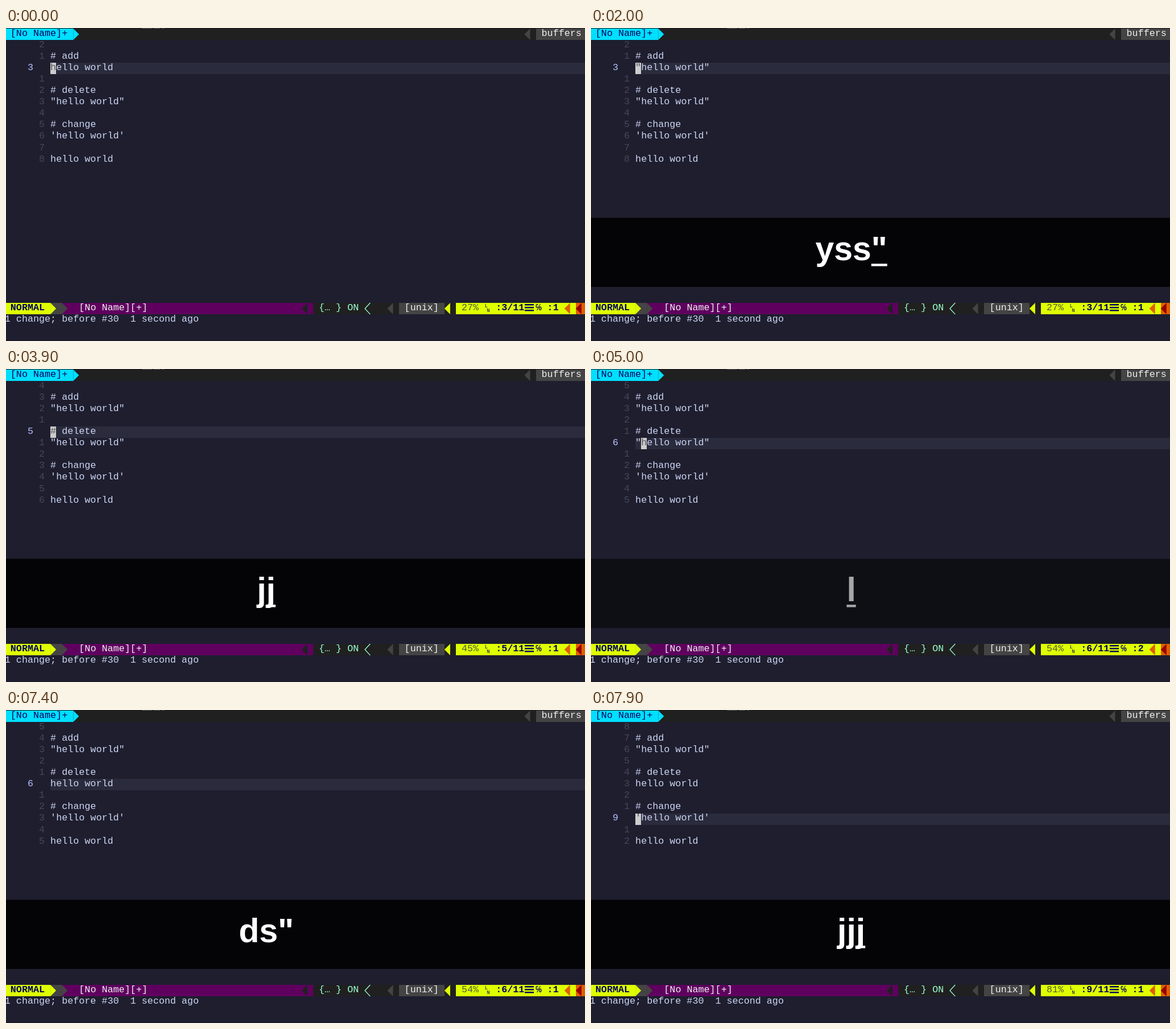
An HTML page with a canvas for the animation above (8000 ms loop, 1018 by 550 pixels).

```html
<!DOCTYPE html>
<html lang="en">
<head>
<meta charset="utf-8">
<title>Editor screencast</title>
<style>
  html, body { margin: 0; width: 100%; height: 100%; overflow: hidden; background: #1e1e2e; }
  canvas { display: block; }
</style>
</head>
<body>
<canvas id="stage" width="1018" height="550"></canvas>
<script>
const ctx = document.getElementById('stage').getContext('2d');
const LOOP = 8000, STEP = 100;
const W = 1018, H = 550;
const CELL_W = 10.04, CELL_H = 20.1, LEFT = -2.2, TOP = 0.7;
const MONO = '16.73px "Liberation Mono", monospace';
const KEY_SIZE = 59, KEY_CENTER = 457.6, KEY_BASELINE = 408;

const C = {
  bg: '#1e1e2e', line: '#2a2b3c', text: '#cdd6f4', num: '#45475a', current: '#b4befe',
  cursor: '#cccccc', bar: '#202020', gray: '#444444', cyan: '#00dfff', yellow: '#dfff00',
  purple: '#5f005f', navy: '#00005f', mint: '#9cffd3', orange: '#df5f00', red: '#990000',
  white: '#f0f0f0'
};

// [time, value]: each value holds until the next entry
const cursorOn = [[0, 1], [500, 0], [1000, 1], [1500, 0], [1600, 1], [2600, 0], [3100, 1], [4600, 0],
  [4900, 1], [5400, 0], [5900, 1], [6400, 0], [6500, 1], [7400, 0], [7600, 1]];
const cursorLine = [[0, 3], [3500, 4], [3800, 5], [4100, 6], [7600, 7], [7800, 8], [7900, 9]];
const cursorCol = [[0, 0], [4900, 1], [6800, 0]];
const pending = [[0, ''], [1300, 'y'], [1600, 'ys'], [1800, 'yss'], [1900, ''], [6300, 'd'], [6500, '']];
const keys = [[0, ''], [1300, 'y'], [1600, 'ys'], [1800, 'yss'], [1900, 'yss"'],
  [3500, 'j'], [3800, 'jj'], [4100, 'jjj'], [5000, 'l'],
  [6300, 'd'], [6500, 'ds'], [6800, 'ds"'], [7600, 'j'], [7800, 'jj'], [7900, 'jjj']];

// [time, opacity]: interpolated linearly
const fade = [[0, 0], [1200, 0], [1300, .22], [1600, 1], [2600, 1], [2700, .73], [2900, .13], [3000, 0],
  [3400, 0], [3500, .1], [3800, .94], [3900, 1], [4700, 1], [4800, .85], [4900, .55], [5000, .63],
  [5200, 1], [5500, 1], [5600, .85], [5800, .25], [5900, 0], [6200, 0], [6300, .1], [6600, .94],
  [6700, 1], [7400, 1], [7500, .7], [7600, .6], [7700, 1], [8000, 1]];

const entryAt = (track, t) => track.findLast(e => e[0] <= t);
const valueAt = (track, t) => entryAt(track, t)[1];

function lerpAt(track, t) {
  const i = track.findIndex(e => e[0] > t);
  const [t0, a] = track[i - 1], [t1, b] = track[i];
  return a + (b - a) * (t - t0) / (t1 - t0);
}

const colX = col => LEFT + col * CELL_W;
const rowY = row => TOP + row * CELL_H;

function rect(color, x, y, w, h) {
  ctx.fillStyle = color;
  ctx.fillRect(x, y, w, h);
}

function cells(color, row, from, to) {
  const x = Math.round(colX(from)), y = Math.round(rowY(row));
  rect(color, x, y, Math.round(colX(to)) - x, Math.round(rowY(row + 1)) - y);
}

function write(str, row, col, color, bold) {
  ctx.font = (bold ? 'bold ' : '') + MONO;
  ctx.fillStyle = color;
  ctx.fillText(str, colX(col), rowY(row) + 12.8);
}

// dir 1 points right, -1 points left
function arrow(row, col, dir, color) {
  const x = colX(dir > 0 ? col : col + 1), y = Math.round(rowY(row));
  ctx.fillStyle = color;
  ctx.beginPath();
  ctx.moveTo(x, y);
  ctx.lineTo(x + dir * CELL_W, y + CELL_H / 2);
  ctx.lineTo(x, y + CELL_H);
  ctx.fill();
}

function drawTabs() {
  rect('#181820', 0, 0, W, 1);
  rect('#55565c', 239, 0, 18, 1);
  rect('#55565c', 260, 0, 11, 1);
  rect('#55565c', 274, 0, 4, 1);
  cells(C.bar, 0, 0, 102);
  cells(C.cyan, 0, 0, 12);
  arrow(0, 12, 1, C.cyan);
  write('[No Name]+', 0, 1, C.navy);
  arrow(0, 91, -1, C.gray);
  cells(C.gray, 0, 93, 102);
  write('buffers', 0, 94, C.white);
}

function drawBuffer(t) {
  const line = valueAt(cursorLine, t), col = valueAt(cursorCol, t);
  const plain = 'hello world', quoted = `"${plain}"`;
  const lines = ['', '# add', t < 1900 ? plain : quoted, '', '# delete',
    t < 6800 ? quoted : plain, '', '# change', `'${plain}'`, '', plain];

  cells(C.line, line, 8, 102);
  lines.forEach((str, i) => {
    const row = i + 1, offset = Math.abs(row - line);
    if (offset) write(String(offset), row, 6, C.num);
    else write(String(row), row, 4, C.current);
    write(str, row, 8, C.text);
  });
  if (valueAt(cursorOn, t)) {
    cells(C.cursor, line, 8 + col, 9 + col);
    write(lines[line - 1][col] || '', line, 8 + col, '#55555c');
  }
}

function drawStatus(t) {
  const row = 24, line = valueAt(cursorLine, t);
  const y = Math.round(rowY(row));
  cells(C.bar, row, 0, 102);
  cells(C.yellow, row, 0, 8);
  cells(C.gray, row, 8, 10);
  cells(C.purple, row, 10, 54);
  arrow(row, 8, 1, C.yellow);
  arrow(row, 10, 1, C.gray);
  write('NORMAL', row, 1, C.navy, true);
  write('[No Name][+]', row, 13, C.white);
  arrow(row, 52, -1, C.bar);
  write('{… } ON', row, 55, C.mint);

  ctx.strokeStyle = C.mint;
  ctx.lineWidth = 1.3;
  ctx.beginPath();
  ctx.moveTo(colX(64), y);
  ctx.lineTo(colX(63) + 0.7, y + CELL_H / 2);
  ctx.lineTo(colX(64), y + CELL_H);
  ctx.stroke();

  arrow(row, 67, -1, C.gray);
  cells(C.gray, row, 69, 77);
  write('[unix]', row, 70, C.white);
  arrow(row, 77, -1, C.yellow);
  cells(C.yellow, row, 79, 100);
  write(Math.floor(line * 100 / 11) + '%', row, 80, 'rgba(0,0,95,.65)');
  ctx.fillStyle = C.navy;
  ctx.font = '9px "Liberation Mono", monospace';
  ctx.fillText('L', colX(84) + 0.5, y + 8);
  ctx.fillText('N', colX(84) + 4, y + 16);
  write(`:${line}/11`, row, 86, C.navy, true);
  for (let i = 0; i < 3; i++) rect(C.navy, 912, y + 2 + i * 5, 16, 2.5);
  write('℅', row, 93, C.navy, true);
  write(':' + (valueAt(cursorCol, t) + 1), row, 95, C.navy, true);
  arrow(row, 98, -1, C.orange);
  cells(C.orange, row, 100, 102);
  arrow(row, 100, -1, C.red);

  write('1 change; before #30  1 second ago', 25, 0, C.text);
  write(valueAt(pending, t), 26, 91, C.text);
  rect('#1a1a28', 0, H - 1, W, 1);
}

function drawKeys(t) {
  const alpha = lerpAt(fade, t);
  if (alpha <= 0) return;
  const [pressed, str] = entryAt(keys, t);
  rect(`rgba(0,0,0,${alpha * 0.85})`, 0, 333.5, W, 121.5);

  ctx.font = `bold ${KEY_SIZE}px "Liberation Sans", sans-serif`;
  const width = ctx.measureText(str).width;
  const left = KEY_CENTER - width / 2;
  ctx.globalAlpha = alpha;
  ctx.fillStyle = '#fff';
  ctx.fillText(str, left, KEY_BASELINE);
  if (t - pressed < 200) {
    const last = ctx.measureText(str.slice(-1)).width;
    ctx.fillRect(left + width - last, 414.2, last, 4.3);
  }
  ctx.globalAlpha = 1;
}

function frame(now) {
  const t = Math.floor((now % LOOP) / STEP) * STEP;
  rect(C.bg, 0, 0, W, H);
  drawTabs();
  drawBuffer(t);
  drawStatus(t);
  drawKeys(t);
  requestAnimationFrame(frame);
}

frame(0);
</script>
</body>
</html>
```
